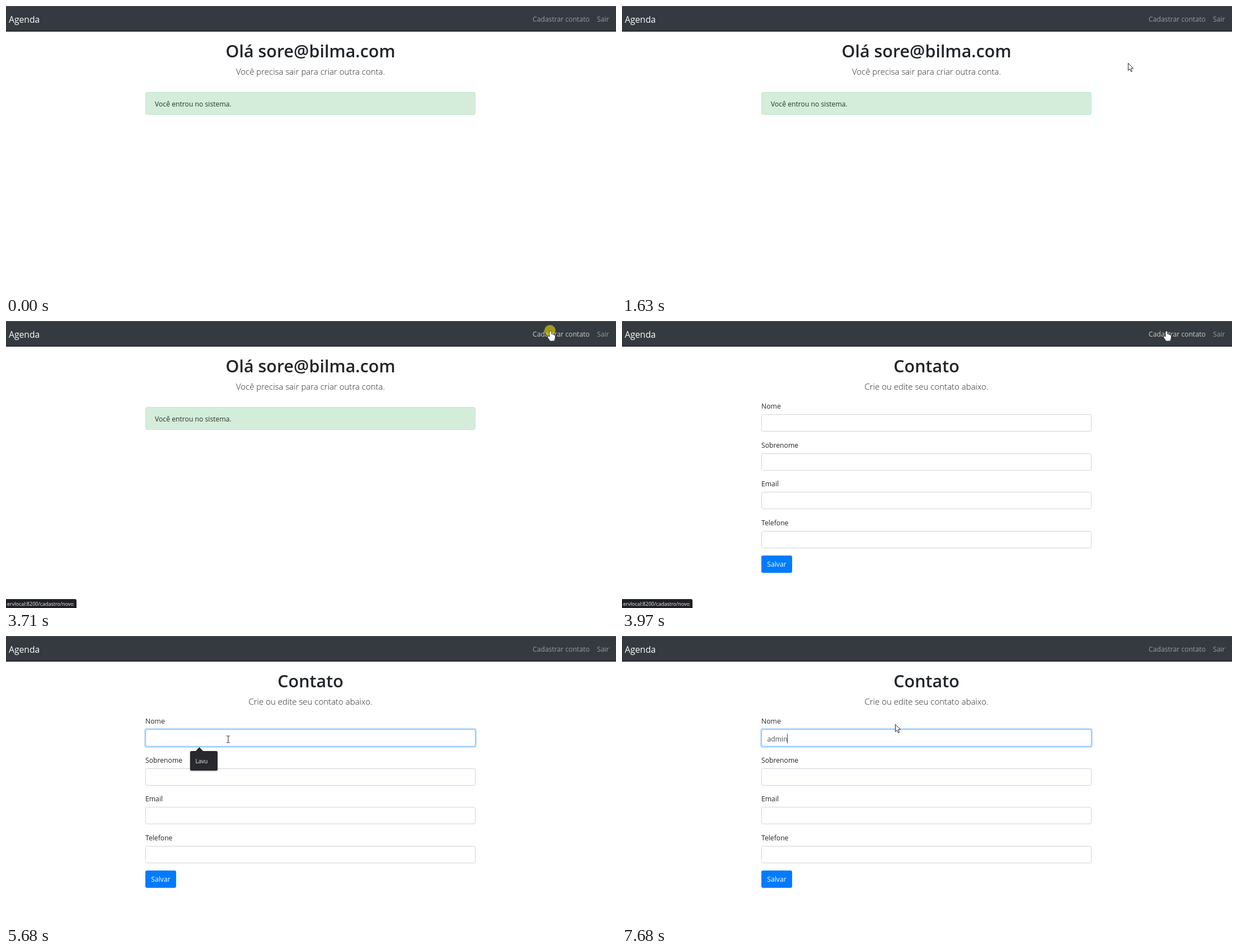
An HTML page with a canvas for the animation above (8 s loop, 1090 by 514 pixels).

```html
<!DOCTYPE html>
<html lang="pt">
<head>
<meta charset="utf-8">
<title>Agenda</title>
<style>
  html, body { margin: 0; width: 100%; height: 100%; overflow: hidden; background: #fff; }
  canvas { display: block; width: 1090px; height: 514px; }
</style>
</head>
<body>
<canvas id="stage"></canvas>
<script>
const W = 1090, H = 514, LOOP = 8000;
const canvas = document.getElementById('stage');
const ctx = canvas.getContext('2d');
const ratio = window.devicePixelRatio || 1;
canvas.width = W * ratio;
canvas.height = H * ratio;

const FORM_AT = 3970, FOCUS_AT = 5130;
const BODY = 12.2;
const FIELDS = ['Nome', 'Sobrenome', 'Email', 'Telefone'];

// Pointer moves: number of steps, then [time, x, y] points
const MOVES = [
  [9, [160, 1047, 499], [330, 1046, 350], [610, 1029, 240]],
  [15, [940, 1025, 236], [1300, 958, 163], [1616, 904, 102], [1730, 904, 91]],
  [11, [1800, 905, 89], [1950, 914, 70], [2150, 952, 32], [2370, 973, 18]],
  [13, [4310, 955, 25], [4500, 640, 84], [4747, 391, 171], [5060, 397, 185]],
  [5, [5680, 397, 185], [5735, 412, 180], [5900, 488, 159]],
  [2, [6070, 488, 159], [6200, 488, 158]]
];
// Times at which each letter is typed
const KEYS = [['a', 6910], ['d', 7240], ['m', 7400], ['i', 7570], ['n', 7680]];

const between = (t, a, b) => t >= a && t < b;
const ramp = (t, a, b) => Math.max(0, Math.min(1, (t - a) / (b - a)));

function pointerAt(t) {
  const move = MOVES.filter(m => m[1][0] <= t).pop();
  if (!move) return null;
  const [steps, ...pts] = move;
  const start = pts[0][0], end = pts[pts.length - 1][0];
  const step = (end - start) / (steps - 1);
  const s = Math.min(end, start + Math.floor((t - start) / step + 1e-6) * step);
  let i = 0;
  while (i < pts.length - 2 && s > pts[i + 1][0]) i++;
  const [t0, x0, y0] = pts[i], [t1, x1, y1] = pts[i + 1];
  const k = ramp(s, t0, t1);
  return { x: Math.round(x0 + (x1 - x0) * k), y: Math.round(y0 + (y1 - y0) * k) };
}

function text(str, x, y, size, color, weight = 400, align = 'left') {
  ctx.font = `${weight} ${size}px "Open Sans", "Noto Sans", sans-serif`;
  ctx.textAlign = align;
  ctx.fillStyle = color;
  ctx.fillText(str, x, y);
}

function box(x, y, w, h, r, fill, stroke) {
  ctx.beginPath();
  ctx.roundRect(x, y, w, h, r);
  if (fill) { ctx.fillStyle = fill; ctx.fill(); }
  if (stroke) { ctx.strokeStyle = stroke; ctx.lineWidth = 1; ctx.stroke(); }
}

function rect(x, y, w, h, color) {
  ctx.fillStyle = color;
  ctx.fillRect(x, y, w, h);
}

function navbar(hover) {
  rect(0, 0, W, 46, '#343a40');
  rect(0, 0, W, 1, '#50555a');
  rect(0, 43, W, 3, '#30323a');
  text('Agenda', 5, 30, 15.7, '#fff');
  text('Cadastrar contato', 941, 28, BODY, hover ? '#cccecf' : '#999c9f');
  text('Sair', 1056, 28, BODY, '#999c9f');
}

function heading(title, lead) {
  text(title, 544, 91.5, 30.5, '#212529', 600, 'center');
  text(lead, 544, 123, 15, '#212529', 300, 'center');
}

function welcome() {
  heading('Olá sore@bilma.com', 'Você precisa sair para criar outra conta.');
  box(249.5, 154.5, 589, 40, 3, '#d4edda', '#c3e6cb');
  text('Você entrou no sistema.', 266, 179.5, BODY, '#26342b');
}

function form(t) {
  heading('Contato', 'Crie ou edite seu contato abaixo.');
  const focus = ramp(t, FOCUS_AT - 50, 5300);
  FIELDS.forEach((name, i) => {
    const y = Math.round(167 + i * 69.6) + 0.5;
    text(name, 249, y - 11, BODY, '#212529');
    if (i === 0 && focus > 0) {
      box(246.8, y - 2.7, 594.4, 35.4, 5, `rgba(0,123,255,${0.25 * focus})`);
      box(249.5, y, 589, 30, 3, '#fff', '#ced4da');
      ctx.globalAlpha = focus;
      box(249.5, y, 589, 30, 3, null, '#80bdff');
      ctx.globalAlpha = 1;
    } else {
      box(249.5, y, 589, 30, 3, '#fff', '#ced4da');
    }
  });
  box(249, 420, 55, 31, 3, '#007bff');
  text('Salvar', 276.5, 440, BODY, '#fff', 400, 'center');

  const typed = KEYS.filter(k => t >= k[1]).map(k => k[0]).join('');
  text(typed, 259.5, 188.5, BODY, '#495057');
  const caret = between(t, FOCUS_AT, 5680) || between(t, 6200, 6740) || t >= KEYS[0][1];
  if (caret) rect(Math.round(259 + ctx.measureText(typed).width), 175, 1, 17, '#495057');
  suggestion(ramp(t, 5180, 5300) * (1 - ramp(t, 6860, 7070)));
}

function suggestion(alpha) {
  if (!alpha) return;
  ctx.save();
  ctx.globalAlpha = alpha;
  ctx.shadowColor = 'rgba(0,0,0,.35)';
  ctx.shadowBlur = 3 * ratio;
  ctx.shadowOffsetY = ratio;
  box(329, 206, 49, 35, 2.5, '#28292d');
  ctx.shadowColor = 'transparent';
  ctx.beginPath();
  ctx.moveTo(338.5, 206.5);
  ctx.lineTo(345.5, 199);
  ctx.lineTo(352.5, 206.5);
  ctx.fill();
  text('Lavu', 338.5, 227.5, 10, '#e8eaed');
  ctx.restore();
}

function status(t) {
  const alpha = ramp(t, 2465, 2660) * (1 - ramp(t, 4670, 4910));
  if (!alpha) return;
  ctx.globalAlpha = alpha;
  box(-4, 498, 130, 20, 3, '#202124');
  text('ervlocal:8200/cadastro/novo', 121, 510, 9, '#f1f3f4', 400, 'right');
  ctx.globalAlpha = 1;
}

function arrow() {
  ctx.beginPath();
  [[.5, .5], [.5, 13.3], [3.4, 10.6], [5.6, 15.6], [7.6, 14.7], [5.5, 9.9], [9.6, 9.6]]
    .forEach(([x, y]) => ctx.lineTo(x, y));
  ctx.closePath();
  ctx.fillStyle = '#fff';
  ctx.fill();
  ctx.strokeStyle = '#222';
  ctx.lineWidth = 1;
  ctx.stroke();
}

function hand() {
  ctx.beginPath();
  ctx.moveTo(-1.5, 11);
  ctx.lineTo(-1.5, 1.4);
  ctx.quadraticCurveTo(0, -1, 1.5, 1.4);
  ctx.lineTo(1.5, 6);
  ctx.quadraticCurveTo(3, 5, 4, 6.6);
  ctx.quadraticCurveTo(5.6, 5.8, 6.2, 7.4);
  ctx.quadraticCurveTo(8, 7, 8, 9);
  ctx.lineTo(8, 12);
  ctx.quadraticCurveTo(7.8, 14, 6.4, 17.5);
  ctx.lineTo(-1, 17.5);
  ctx.quadraticCurveTo(-2, 15, -5, 11.5);
  ctx.quadraticCurveTo(-5.4, 8.8, -3, 9.6);
  ctx.closePath();
  ctx.strokeStyle = '#24272b';
  ctx.lineWidth = 1.4;
  ctx.stroke();
  ctx.fillStyle = '#fff';
  ctx.fill();
}

function beam() {
  rect(-.5, -6, 1, 12, '#222');
  for (const y of [-6.5, 5.5]) {
    rect(-3, y, 2.5, 1, '#222');
    rect(.5, y, 2.5, 1, '#222');
  }
}

function draw(t) {
  ctx.setTransform(ratio, 0, 0, ratio, 0, 0);
  rect(0, 0, W, H, '#fff');
  const p = pointerAt(t);
  const onLink = p && p.x > 941 && p.x < 1043 && p.y > 10 && p.y < 36;
  const onField = p && t >= FORM_AT && p.x > 249 && p.x < 839 && p.y > 167 && p.y < 198;

  navbar(onLink);
  if (t < FORM_AT) welcome();
  else form(t);
  status(t);

  if (!p) return;
  if (between(t, 3710, 3800) || between(t, FOCUS_AT, 5220)) {
    ctx.beginPath();
    ctx.arc(p.x - 1, p.y - 1, 10, 0, Math.PI * 2);
    ctx.fillStyle = 'rgba(236,220,0,.6)';
    ctx.fill();
  }
  ctx.translate(p.x, p.y);
  if (onLink) hand();
  else if (onField) beam();
  else arrow();
}

function tick() {
  draw(performance.now() % LOOP);
  requestAnimationFrame(tick);
}
tick();
</script>
</body>
</html>
```
